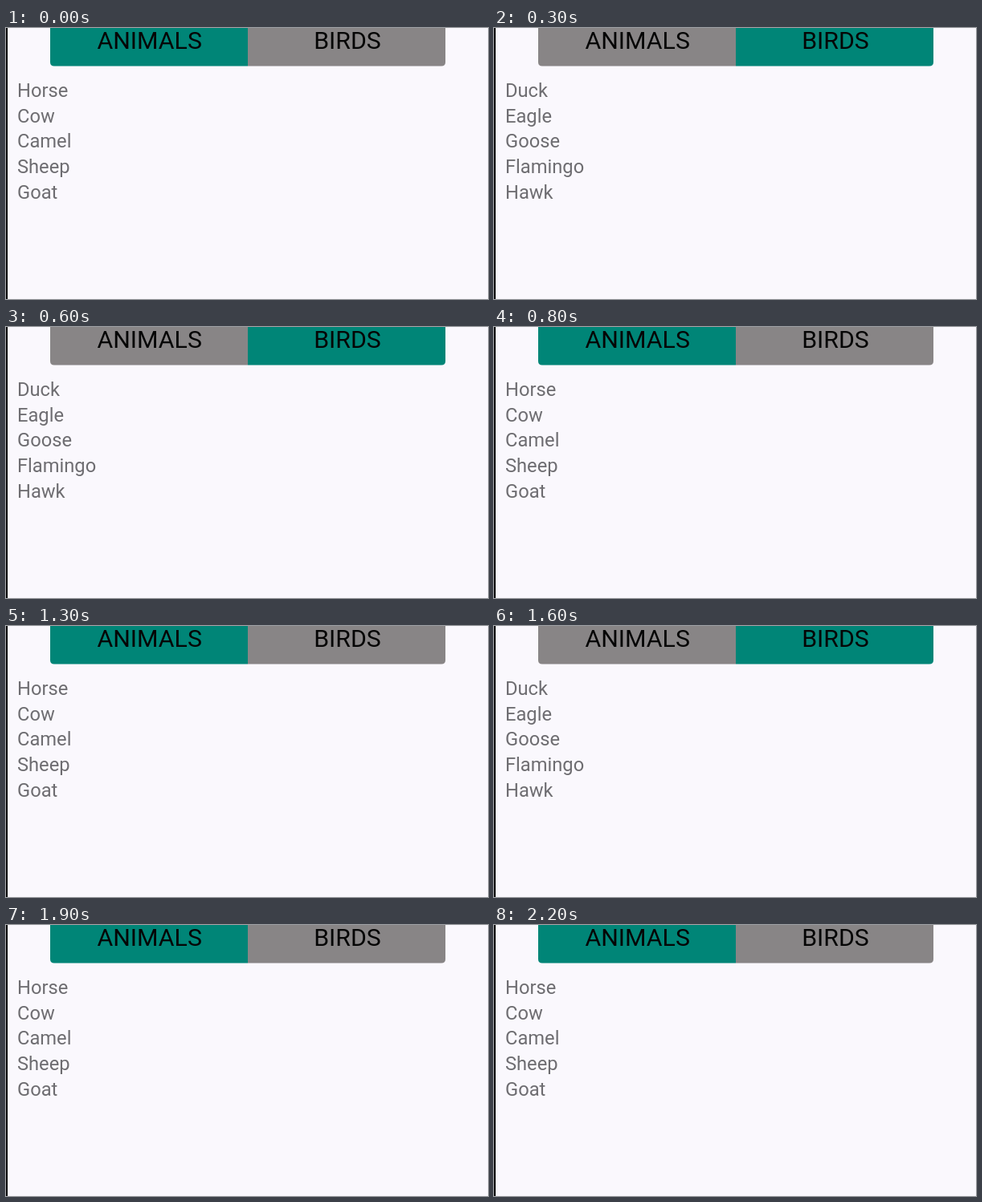
An HTML page for the animation above (2.4 s loop, 600x338 px).

```html
<!DOCTYPE html>
<html lang="en">
<head>
<meta charset="utf-8">
<title>Segmented list</title>
<style>
  html, body { margin: 0; width: 100%; height: 100%; overflow: hidden; background: #faf8fd; }
  svg { display: block; font-family: Roboto, sans-serif; }
  .tab { font-size: 30.3px; text-anchor: middle; fill: #050505; }
  .item { font-size: 23.7px; fill: #6e6d71; }
</style>
</head>
<body>
<svg width="600" height="338" viewBox="0 0 600 338">
  <rect width="2" height="338" fill="#000"/>
  <path id="left" d="M55 0H301V47.5H60Q55 47.5 55 42.5Z"/>
  <path id="right" d="M301 0H547V42.5Q547 47.5 542 47.5H301Z"/>
  <text class="tab" x="178.7" y="26">ANIMALS</text>
  <text class="tab" x="425" y="26">BIRDS</text>
  <g id="list"></g>
</svg>
<script>
const LOOP = 2400;
const ACTIVE = "#008577", IDLE = "#888586";
const ANIMALS = ["Horse", "Cow", "Camel", "Sheep", "Goat"];
const BIRDS = ["Duck", "Eagle", "Goose", "Flamingo", "Hawk"];
const byId = id => document.getElementById(id);
const left = byId("left"), right = byId("right"), list = byId("list");

const rows = ANIMALS.map((_, i) => {
  const row = document.createElementNS("http://www.w3.org/2000/svg", "text");
  row.setAttribute("class", "item");
  row.setAttribute("x", 14);
  row.setAttribute("y", 86.2 + i * 31.6);
  return list.appendChild(row);
});

let shown;
function select(birds) {
  if (birds === shown) return;
  shown = birds;
  left.setAttribute("fill", birds ? IDLE : ACTIVE);
  right.setAttribute("fill", birds ? ACTIVE : IDLE);
  rows.forEach((row, i) => row.textContent = (birds ? BIRDS : ANIMALS)[i]);
}

const start = performance.now();
function draw() {
  const t = (performance.now() - start) % LOOP;
  select((t >= 300 && t < 800) || (t >= 1600 && t < 1900));
  requestAnimationFrame(draw);
}
draw();
</script>
</body>
</html>
```
